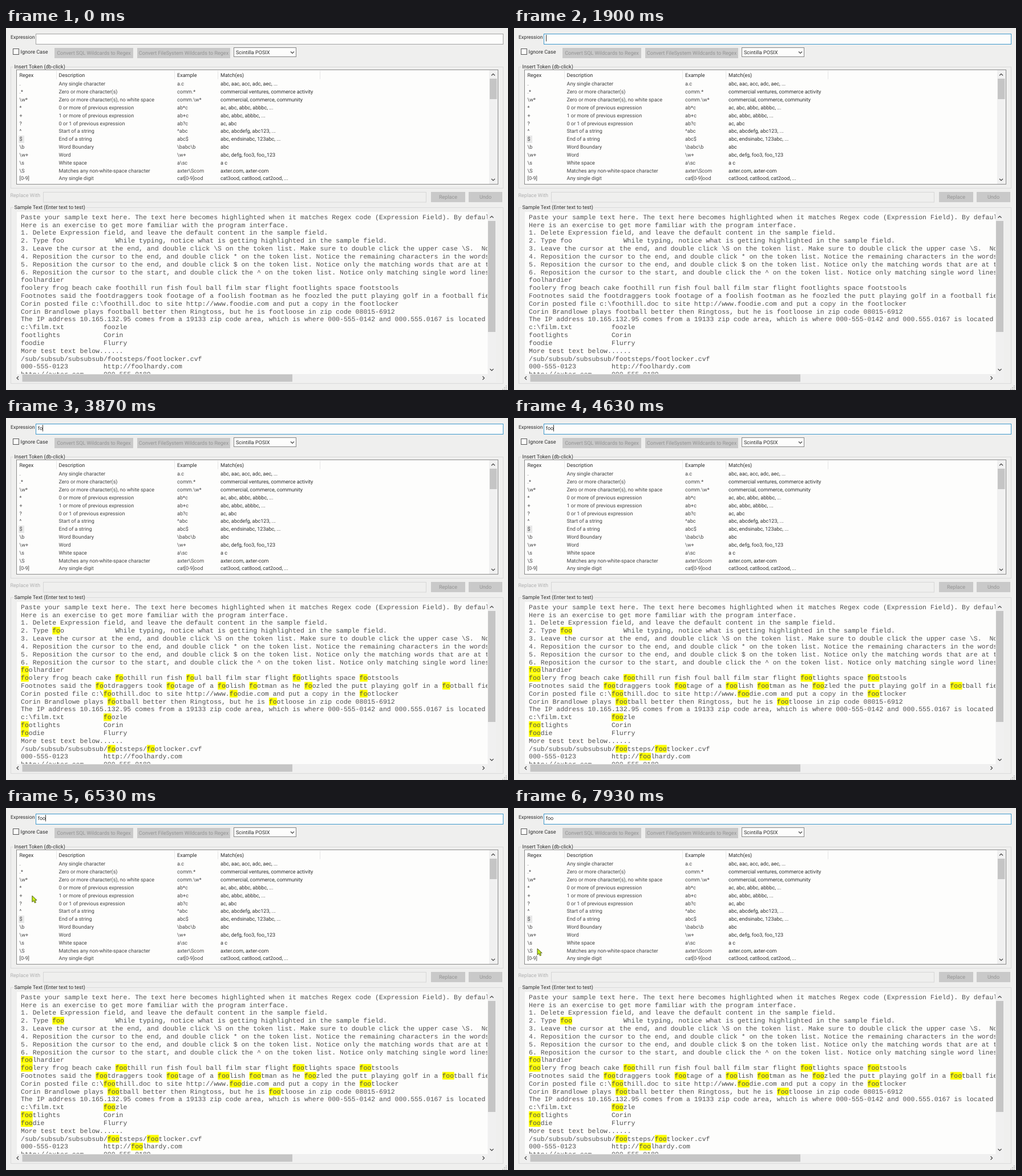
An HTML page for the animation above (8 s loop, 880 by 636 pixels).

```html
<!DOCTYPE html>
<html lang="en">
<head>
<meta charset="utf-8">
<title>Regex tester</title>
<style>
  html, body { margin: 0; width: 100%; height: 100%; overflow: hidden; background: #efefee; }
  svg { display: block; width: 880px; height: 636px; }
  text { font: 9.05px Roboto, "Noto Sans", sans-serif; fill: #2e2e2e; white-space: pre; text-rendering: geometricPrecision; }
  .mono text { font: 11.51px "Liberation Mono", monospace; fill: #505050; }
  .off { fill: #939393; }
  .soft { fill: #444; }
</style>
</head>
<body>
<svg id="stage" viewBox="0 0 880 636" xmlns="http://www.w3.org/2000/svg"></svg>
<script>
const stage = document.getElementById('stage');
const LOOP = 8000, WHITE = '#fdfdfc', THUMB = '#c5c5c5', TRACK = '#f0f0f0';
const ROW = 13.83, CHAR = 6.906, TEXT_X = 26, TEXT_Y = 335.7;

function add(tag, attrs, parent = stage) {
  const node = document.createElementNS('http://www.w3.org/2000/svg', tag);
  for (const key in attrs) node.setAttribute(key, attrs[key]);
  return parent.appendChild(node);
}
const box = (x, y, width, height, fill, stroke = 'none', parent) =>
  add('rect', { x, y, width, height, fill, stroke }, parent);
function label(text, x, y, attrs = {}, parent) {
  const node = add('text', { x, y, ...attrs }, parent);
  node.textContent = text;
  return node;
}
const line = (d, stroke, width = 1) =>
  add('path', { d, stroke, fill: 'none', 'stroke-width': width });
function chevron(x, y, angle, color = '#444') {
  line('M-3 1.5 L0 -1.5 L3 1.5', color, 1.2)
    .setAttribute('transform', `translate(${x} ${y}) rotate(${angle})`);
}
function button(text, x, y, width) {
  box(x, y, width, 18, '#c9c9c9');
  label(text, x + width / 2, y + 12.4, { 'text-anchor': 'middle', class: 'off' });
}
function group(text, y, height, gap) {
  box(8.5, y, 863, height, 'none', '#dadada');
  box(13, y - 3, gap, 6, '#efefee');
  label(text, 14.5, y + 2.7);
}

// Expression bar
label('Expression', 8, 19, { style: 'font-size:8.7px' });
const field = box(52.5, 10.5, 819, 18, WHITE, '#a2a2a2');
box(12.5, 36.5, 10, 10, WHITE, '#555');
label('Ignore Case', 25.5, 45);
button('Convert SQL Wildcards to Regex', 85, 35, 138);
button('Convert FileSystem Wildcards to Regex', 230, 35, 163);
box(399.5, 34.5, 109, 16, WHITE, '#858585');
label('Scintilla POSIX', 403, 46);
chevron(502, 43, 180);

// Token list
group('Insert Token (db-click)', 68.5, 213, 92);
box(18.5, 73.5, 844, 201, WHITE, '#8a8a8a');
for (const x of [88.5, 295.5, 371.5, 550.5]) line(`M${x} 75 V90`, '#e6e6e6');
box(847, 74, 15, 200, TRACK);
box(848, 89, 12.5, 36, THUMB);
chevron(854, 82, 0);
chevron(854, 266.5, 180);
box(22, 189, 10, 13, '#e7e7e7');

const columns = [23.5, 92.5, 300, 376];
const tokens = [
  ['.', 'Any single character', 'a.c', 'abc, aac, acc, adc, aec, ...'],
  ['.*', 'Zero or more character(s)', 'comm.*', 'commercial ventures, commerce activity'],
  ['\\w*', 'Zero or more character(s), no white space', 'comm.\\w*', 'commercial, commerce, community'],
  ['*', '0 or more of previous expression', 'ab*c', 'ac, abc, abbc, abbbc, ...'],
  ['+', '1 or more of previous expression', 'ab+c', 'abc, abbc, abbbc, ...'],
  ['?', '0 or 1 of previous expression', 'ab?c', 'ac, abc'],
  ['^', 'Start of a string', '^abc', 'abc, abcdefg, abc123, ...'],
  ['$', 'End of a string', 'abc$', 'abc, endsinabc, 123abc, ...'],
  ['\\b', 'Word Boundary', '\\babc\\b', 'abc'],
  ['\\w+', 'Word', '\\w+', 'abc, defg, foo3, foo_123'],
  ['\\s', 'White space', 'a\\sc', 'a c'],
  ['\\S', 'Matches any non-white-space character', 'axter\\Scom', 'axter.com, axter-com'],
  ['[0-9]', 'Any single digit', 'cat[0-9]ood', 'cat3ood, cat8ood, cat2ood, ...']
];
['Regex', 'Description', 'Example', 'Match(es)'].forEach((text, c) => label(text, columns[c], 86.3));
tokens.forEach((cells, r) => cells.forEach((text, c) =>
  label(text, columns[c], 101.4 + r * ROW, { class: c < 3 ? 'soft' : '' })));

// Replace bar
label('Replace With', 7.5, 296.5, { style: 'fill:#b0b0b0' });
box(65.5, 288.5, 671, 17.5, '#efefee', '#d6d6d6');
button('Replace', 745, 288, 60);
button('Undo', 811, 288, 59);

// Sample text
group('Sample Text (Enter text to test)', 315.5, 309, 128);
box(19, 323, 840, 299, WHITE);
const clip = add('clipPath', { id: 'page' });
box(19, 323, 825, 284.5, '#000', 'none', clip);
const page = add('g', { class: 'mono', 'clip-path': 'url(#page)' });

const pair = (left, right) => left.padEnd(21) + right;
const sample = [
  'Paste your sample text here. The text here becomes highlighted when it matches Regex code (Expression Field). By default',
  'Here is an exercise to get more familiar with the program interface.',
  '1. Delete Expression field, and leave the default content in the sample field.',
  '2. Type foo'.padEnd(24) + 'While typing, notice what is getting highlighted in the sample field.',
  '3. Leave the cursor at the end, and double click \\S on the token list. Make sure to double click the upper case \\S.  Not',
  '4. Reposition the cursor to the end, and double click * on the token list. Notice the remaining characters in the words',
  '5. Reposition the cursor to the end, and double click $ on the token list. Notice only the matching words that are at the',
  '6. Reposition the cursor to the start, and double click the ^ on the token list. Notice only matching single word lines',
  'foolhardier',
  'foolery frog beach cake foothill run fish foul ball film star flight footlights space footstools',
  'Footnotes said the footdraggers took footage of a foolish footman as he foozled the putt playing golf in a football field',
  'Corin posted file c:\\foothill.doc to site http://www.foodie.com and put a copy in the footlocker',
  'Corin Brandlowe plays football better then Ringtoss, but he is footloose in zip code 08015-6912',
  'The IP address 10.165.132.95 comes from a 19133 zip code area, which is where 000-555-0142 and 000.555.0167 is located',
  pair('c:\\film.txt', 'foozle'),
  pair('footlights', 'Corin'),
  pair('foodie', 'Flurry'),
  'More test text below......',
  '/sub/subsub/subsubsub/footsteps/footlocker.cvf',
  pair('000-555-0123', 'http://foolhardy.com'),
  pair('http://axter.com', '000-555-0189')
];

// The highlighter stops after a limited number of matches
function highlight(word, limit) {
  const layer = add('g', { visibility: 'hidden' }, page);
  sample.forEach((text, r) => {
    for (const match of text.matchAll(new RegExp(word, 'g'))) {
      if (limit-- <= 0) return;
      box(TEXT_X + match.index * CHAR, TEXT_Y - 10.3 + r * ROW, word.length * CHAR, 13.4, '#ffff00', 'none', layer);
    }
  });
  return layer;
}
const layers = { f: highlight('f', 30), fo: highlight('fo', 23), foo: highlight('foo', 99) };
sample.forEach((text, r) => label(text, TEXT_X, TEXT_Y + r * ROW, {}, page));

box(844.5, 323, 14.5, 285, TRACK);
box(845, 339, 13, 195, THUMB);
chevron(851.5, 332, 0);
chevron(851.5, 600.5, 180);
box(19, 608, 840, 14, TRACK);
box(28.5, 608.5, 473.5, 13, THUMB);
chevron(20.5, 615, -90);
chevron(837, 615, 90);
for (let i = 0; i < 3; i++)
  for (let j = 0; j <= i; j++) box(876 - j * 3, 628 + i * 3, 1.6, 1.6, '#b5b5b5');

// Moving parts
const typed = label('', 55.8, 20.6);
const caret = box(56, 12, 1, 11.5, '#333');
const arrow = add('path', {
  d: 'M0 0 V11 L2.6 8.7 L4.6 12.6 L6.6 11.6 L4.8 7.8 H8.2 Z',
  fill: '#c4ee1c', stroke: '#4f5a18', 'stroke-width': 1
});
const beam = add('path', {
  d: 'M-3.5 -5.5 H3.5 M0 -5.5 V5.5 M-3.5 5.5 H3.5',
  stroke: '#4f5a18', 'stroke-width': 2, fill: 'none'
});

const edits = [
  { at: 580, text: '', caret: 0 },
  { at: 2700, text: 'f', caret: 3 },
  { at: 3500, text: 'fo', caret: 8 },
  { at: 4115, text: 'foo', caret: 13 }
];
const trips = [
  [[2800, 180, 22.5], [3400, 180, 22.5]],
  [[5850, 178, 22], [6450, 46, 153], [6950, 44, 170], [7600, 41, 247], [LOOP, 41, 247]]
];
const show = (node, on) => node.setAttribute('visibility', on ? 'visible' : 'hidden');

function pointerAt(t) {
  const trip = trips.find(p => t >= p[0][0] && t < p[p.length - 1][0]);
  if (!trip) return null;
  const i = trip.findIndex(p => p[0] > t);
  const [t0, x0, y0] = trip[i - 1], [t1, x1, y1] = trip[i];
  const k = (t - t0) / (t1 - t0), e = k * k * (3 - 2 * k);
  return [x0 + (x1 - x0) * e, y0 + (y1 - y0) * e];
}

function draw(t) {
  const edit = edits.filter(e => e.at <= t).pop();
  const text = edit ? edit.text : '';
  field.setAttribute('stroke', edit ? '#3c97cb' : '#a2a2a2');
  typed.textContent = text;
  show(caret, edit && (t - edit.at) % 1060 < 530);
  if (edit) caret.setAttribute('x', 56 + edit.caret);
  for (const word in layers) show(layers[word], word === text);

  const pos = pointerAt(t);
  const overField = pos && pos[1] < 29;
  show(beam, overField);
  show(arrow, pos && !overField);
  if (pos) (overField ? beam : arrow).setAttribute('transform', `translate(${pos})`);
}

const start = performance.now();
function tick() {
  draw((performance.now() - start) % LOOP);
  requestAnimationFrame(tick);
}
tick();
</script>
</body>
</html>
```
